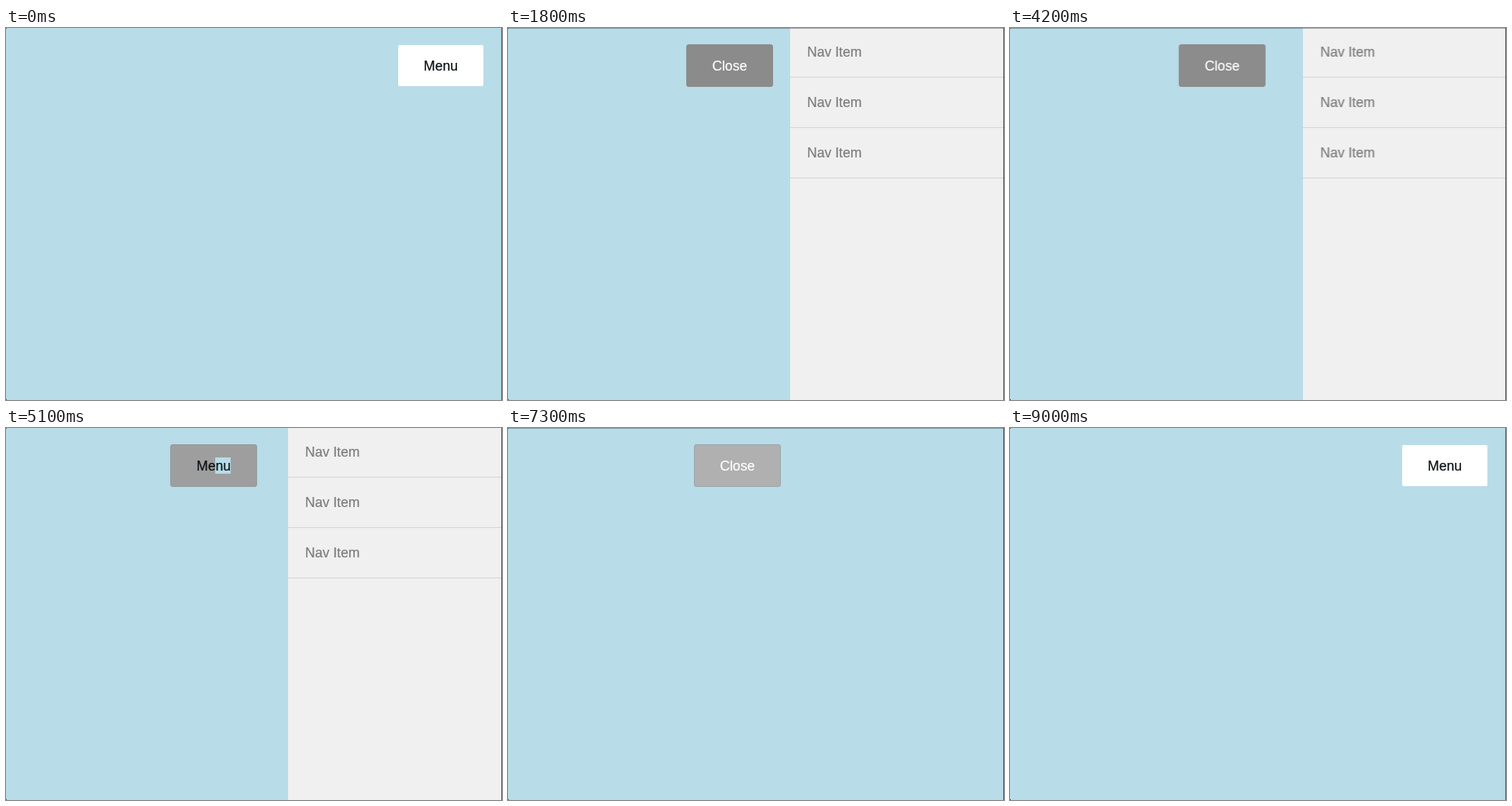
An HTML page for the animation above (9.1 s loop, 640x480 px).

```html
<!DOCTYPE html>
<html lang="en">
<head>
<meta charset="utf-8">
<title>Slide-in menu</title>
<style>
  html, body { margin: 0; width: 100%; height: 100%; overflow: hidden; }
  body {
    position: relative;
    background: #b8dce8;
    font: 17.6px/20px "Liberation Sans", Arial, sans-serif;
    -webkit-text-stroke: .2px;
  }
  #stage { position: absolute; left: 0; top: 0; width: 640px; height: 480px; overflow: hidden; }
  #nav {
    position: absolute; left: 639px; top: 0; width: 340px; height: 480px;
    margin: 0; padding: 0; list-style: none;
    background: #f0f0f0; color: #7c7c7c;
  }
  #nav li {
    box-sizing: border-box; height: 65px; padding: 22px 0 0 22px;
    border-bottom: 1px solid #d4d4d4;
  }
  #nav li:first-child { height: 64px; padding-top: 21px; }
  #button {
    position: absolute; left: 505px; top: 21px; width: 112px; height: 55px;
    box-sizing: border-box; border: 1px solid #b8dce8; border-radius: 3px;
    background: #fff;
  }
  #button span {
    position: absolute; left: 0; top: 17px; width: 110px; height: 21px;
    line-height: 21px; text-align: center;
  }
  #menu { color: #0a0f12; }
  #close { color: #fff; opacity: 0; }
  #mark {
    position: absolute; left: 57px; top: 16px; width: 20px; height: 21px;
    background: #b8dce8; opacity: 0;
  }
  #top, #side { position: absolute; background: #000; }
  #top { left: 0; top: 0; width: 640px; height: 1px; opacity: 0; }
  #side { left: 639px; top: 0; width: 1px; height: 480px; opacity: .6; }
  .corner { position: absolute; width: 1px; height: 1px; left: 0; background: #34464c; }
</style>
</head>
<body>
<div id="stage">
  <ul id="nav"><li>Nav Item</li><li>Nav Item</li><li>Nav Item</li></ul>
  <div id="button">
    <i id="mark"></i>
    <span id="menu">Menu</span>
    <span id="close">Close</span>
  </div>
  <div id="top"></div>
  <div id="side"></div>
  <i class="corner" style="top:0"></i>
  <i class="corner" style="top:479px"></i>
</div>
<script>
  const LOOP = 9100, MOVE = 360, LAG = 120, SHIFT = 275;
  const BACK = 'cubic-bezier(.68,-.55,.265,1.55)';
  const CYCLES = [[273, 2100], [3865, 5000], [7082, 8440]];  // [open, close]
  const $ = id => document.getElementById(id);

  function play(id, frames) {
    $(id).animate(frames, { duration: LOOP, iterations: Infinity });
  }

  // Ease between the closed and open styles at each click.
  function toggle(id, shut, open, { delay = 0, easing = BACK } = {}) {
    const at = (time, style) => ({ offset: (time + delay) / LOOP, easing, ...style });
    const frames = [{ offset: 0, ...shut }];
    for (const [a, b] of CYCLES)
      frames.push(at(a, shut), at(a + MOVE, open), at(b, open), at(b + MOVE, shut));
    frames.push({ offset: 1, ...shut });
    play(id, frames);
  }

  // Hard switch of opacity: list of [time, value].
  function flip(id, steps) {
    const frames = steps.map(([time, opacity]) =>
      ({ offset: time / LOOP, opacity, easing: 'steps(1, end)' }));
    frames.push({ offset: 1, opacity: steps[0][1] });
    play(id, frames);
  }

  const swap = (shut, open) =>
    [[0, shut], ...CYCLES.flatMap(([a, b]) => [[a, open], [b, shut]])];
  const slide = x => ({ transform: `translateX(${x}px)` });

  toggle('button', slide(0), slide(-SHIFT));
  toggle('nav', slide(0), slide(-SHIFT), { delay: LAG });
  toggle('button',
    { backgroundColor: '#fff', borderColor: '#b8dce8' },
    { backgroundColor: '#8b8b8b', borderColor: '#8b8b8b' },
    { easing: 'ease-in-out' });
  flip('menu', swap(1, 0));
  flip('close', swap(0, 1));
  flip('top', swap(0, .3));

  // Part of the label stays selected from the first close until it is cleared.
  const [[, close1], [open2, close2]] = CYCLES;
  flip('mark', [[0, 0], [close1, 1], [open2, 0], [close2, 1], [6200, 0]]);
</script>
</body>
</html>
```
